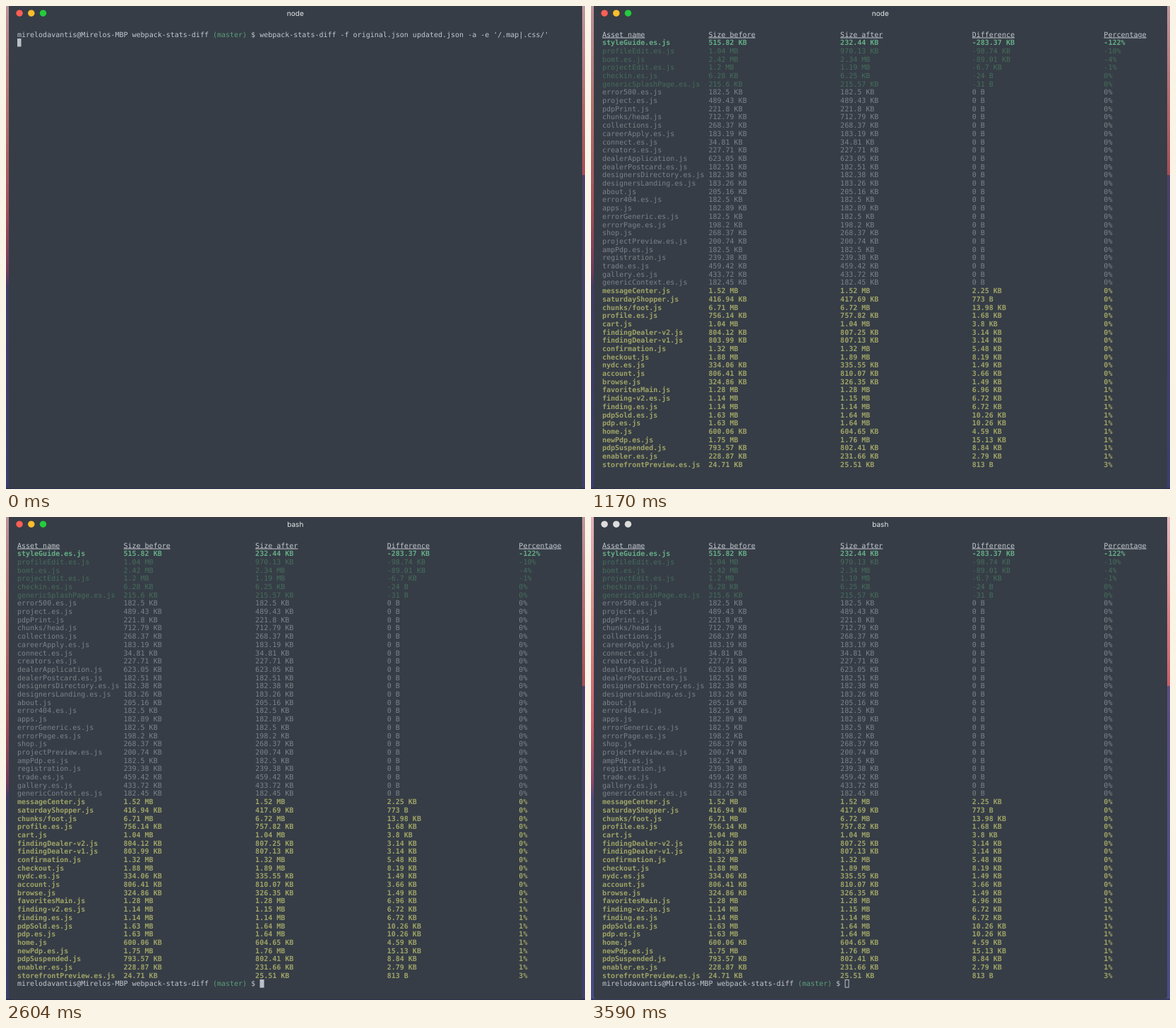
Recreate the animation shown at these times as an HTML page. Size 820 px wide and 683 px high, loop 3690 ms.

```html
<!DOCTYPE html>
<html lang="en">
<head>
<meta charset="utf-8">
<title>Terminal</title>
<style>
  html, body { margin: 0; width: 100%; height: 100%; overflow: hidden; background: #363d46; }
  svg { display: block; width: 820px; height: 683px; }
  text { white-space: pre; text-rendering: geometricPrecision; }
  /* The tiny skew keeps baselines at fractional pixels. */
  .mono {
    font: 10px "DejaVu Sans Mono", monospace; fill: #c3c7ce;
    transform: skewY(.005deg); transform-box: fill-box;
  }
  .title { font: 10px Inter, sans-serif; fill: #e6e8eb; text-anchor: middle; }
  .head { text-decoration: underline; }
  .best { fill: #65ad86; font-weight: bold; }
  .less { fill: #466d5c; }
  .same { fill: #7d8288; }
  .more { fill: #9fa367; font-weight: bold; }
  .branch { fill: #5b9e7c; }
</style>
</head>
<body>
<svg id="stage" viewBox="0 0 820 683">
  <defs>
    <linearGradient id="leftEdge" x1="0" y1="0" x2="0" y2="1">
      <stop offset="0" stop-color="#e3b3bb"/>
      <stop offset=".2" stop-color="#d98d88"/>
      <stop offset=".42" stop-color="#c9616c"/>
      <stop offset=".55" stop-color="#8a4870"/>
      <stop offset=".58" stop-color="#514a7c"/>
      <stop offset="1" stop-color="#474c86"/>
    </linearGradient>
    <linearGradient id="rightEdge" x1="0" y1="0" x2="0" y2="1">
      <stop offset="0" stop-color="#e9b9c2"/>
      <stop offset=".2" stop-color="#dc8086"/>
      <stop offset=".35" stop-color="#cd5d69"/>
      <stop offset=".35" stop-color="#5c4f82"/>
      <stop offset="1" stop-color="#484d87"/>
    </linearGradient>
  </defs>
  <rect width="410" height="683" fill="url(#leftEdge)"/>
  <rect x="410" width="410" height="683" fill="url(#rightEdge)"/>
  <rect y="681" width="820" height="2" fill="#373d60"/>
</svg>
<script>
const LOOP = 3690, LISTED = 1170, DONE = 1350, BLURRED = 3440, HOLLOW = 3590;
const LEFT = 16, CHAR = 6.02, TOP = 34.2, LINE = 11.697;
const COLUMNS = [0, 25, 56, 87, 118];
const stage = document.getElementById('stage');

function add(parent, tag, attrs, content = '') {
  const node = document.createElementNS('http://www.w3.org/2000/svg', tag);
  for (const key in attrs) node.setAttribute(key, attrs[key]);
  node.textContent = content;
  return parent.appendChild(node);
}

// A group that is visible only between two times of the loop.
function scene(from, to) {
  const group = add(stage, 'g', {});
  const step = (opacity, time) => ({ opacity, offset: time / LOOP, easing: 'step-end' });
  const steps = [step(1, from), step(to < LOOP ? 0 : 1, to)];
  if (from > 0) steps.unshift(step(0, 0));
  if (to < LOOP) steps.push(step(0, LOOP));
  group.animate(steps, { duration: LOOP, iterations: Infinity });
  return group;
}

const write = (parent, row, column, style, content) => add(parent, 'text', {
  x: LEFT + column * CHAR, y: TOP + row * LINE + 9.3, class: 'mono ' + style
}, content);

function prompt(parent, row, command = '') {
  write(parent, row, 0, '', 'mirelodavantis@Mirelos-MBP webpack-stats-diff');
  write(parent, row, 46, 'branch', '(master)');
  write(parent, row, 55, '', '$ ' + command);
}

function lights(parent, colors) {
  colors.forEach((fill, i) => add(parent, 'circle', {
    cx: 19.1 + i * 16.7, cy: 10.2, r: 4.8, fill, stroke: '#0002', 'stroke-width': .6
  }));
}

const title = (parent, name) => add(parent, 'text', { x: 409.8, y: 13.6, class: 'title' }, name);

add(scene(0, BLURRED), 'rect', { width: 820, height: 683, fill: '#000', opacity: .18 });
add(stage, 'rect', { x: 4, y: -10, width: 812, height: 692, rx: 5, fill: '#363d46' });

lights(scene(0, BLURRED), ['#fc5f57', '#fdbd2e', '#25cb3e']);
lights(scene(BLURRED, LOOP), ['#dddddd', '#dddddd', '#dddddd']);
title(scene(0, DONE), 'node');
title(scene(DONE, LOOP), 'bash');

const start = scene(0, LISTED);
prompt(start, 0, "webpack-stats-diff -f original.json updated.json -a -e '/.map|.css/'");
add(start, 'rect', { x: 16, y: 46, width: 5.5, height: 11.5, fill: '#bcc1c9' });

// Each entry: asset, size before, size after, difference, percentage.
const best = 'styleGuide.es.js,515.82 KB,232.44 KB,-283.37 KB,-122%';
const less = `profileEdit.es.js,1.04 MB,970.13 KB,-98.74 KB,-10%
bomt.es.js,2.42 MB,2.34 MB,-89.01 KB,-4%
projectEdit.es.js,1.2 MB,1.19 MB,-6.7 KB,-1%
checkin.es.js,6.28 KB,6.25 KB,-24 B,0%
genericSplashPage.es.js,215.6 KB,215.57 KB,-31 B,0%`;
// Unchanged assets need only a name and one size in KB.
const same = `error500.es.js,182.5
project.es.js,489.43
pdpPrint.js,221.8
chunks/head.js,712.79
collections.js,268.37
careerApply.es.js,183.19
connect.es.js,34.81
creators.es.js,227.71
dealerApplication.js,623.05
dealerPostcard.es.js,182.51
designersDirectory.es.js,182.38
designersLanding.es.js,183.26
about.js,205.16
error404.es.js,182.5
apps.js,182.89
errorGeneric.es.js,182.5
errorPage.es.js,198.2
shop.js,268.37
projectPreview.es.js,200.74
ampPdp.es.js,182.5
registration.js,239.38
trade.es.js,459.42
gallery.es.js,433.72
genericContext.es.js,182.45`.replace(/,(.+)/g, ',$1 KB,$1 KB,0 B,0%');
const more = `messageCenter.js,1.52 MB,1.52 MB,2.25 KB,0%
saturdayShopper.js,416.94 KB,417.69 KB,773 B,0%
chunks/foot.js,6.71 MB,6.72 MB,13.98 KB,0%
profile.es.js,756.14 KB,757.82 KB,1.68 KB,0%
cart.js,1.04 MB,1.04 MB,3.8 KB,0%
findingDealer-v2.js,804.12 KB,807.25 KB,3.14 KB,0%
findingDealer-v1.js,803.99 KB,807.13 KB,3.14 KB,0%
confirmation.js,1.32 MB,1.32 MB,5.48 KB,0%
checkout.js,1.88 MB,1.89 MB,8.19 KB,0%
nydc.es.js,334.06 KB,335.55 KB,1.49 KB,0%
account.js,806.41 KB,810.07 KB,3.66 KB,0%
browse.js,324.86 KB,326.35 KB,1.49 KB,0%
favoritesMain.js,1.28 MB,1.28 MB,6.96 KB,1%
finding-v2.es.js,1.14 MB,1.15 MB,6.72 KB,1%
finding.es.js,1.14 MB,1.14 MB,6.72 KB,1%
pdpSold.es.js,1.63 MB,1.64 MB,10.26 KB,1%
pdp.es.js,1.63 MB,1.64 MB,10.26 KB,1%
home.js,600.06 KB,604.65 KB,4.59 KB,1%
newPdp.es.js,1.75 MB,1.76 MB,15.13 KB,1%
pdpSuspended.js,793.57 KB,802.41 KB,8.84 KB,1%
enabler.es.js,228.87 KB,231.66 KB,2.79 KB,1%
storefrontPreview.es.js,24.71 KB,25.51 KB,813 B,3%`;
const head = 'Asset name,Size before,Size after,Difference,Percentage';

const listing = scene(LISTED, LOOP);
let row = 0;
for (const [style, lines] of Object.entries({ head, best, less, same, more })) {
  for (const line of lines.split('\n')) {
    line.split(',').forEach((cell, i) => write(listing, row, COLUMNS[i], style, cell));
    row++;
  }
}

prompt(scene(DONE, LOOP), row);
add(scene(DONE, HOLLOW), 'rect', { x: 359.5, y: 654, width: 6, height: 11.6, fill: '#bcc1c9' });
add(scene(HOLLOW, LOOP), 'rect', {
  x: 360, y: 654.5, width: 5, height: 10.6, fill: 'none', stroke: '#bcc1c9'
});
</script>
</body>
</html>
```
